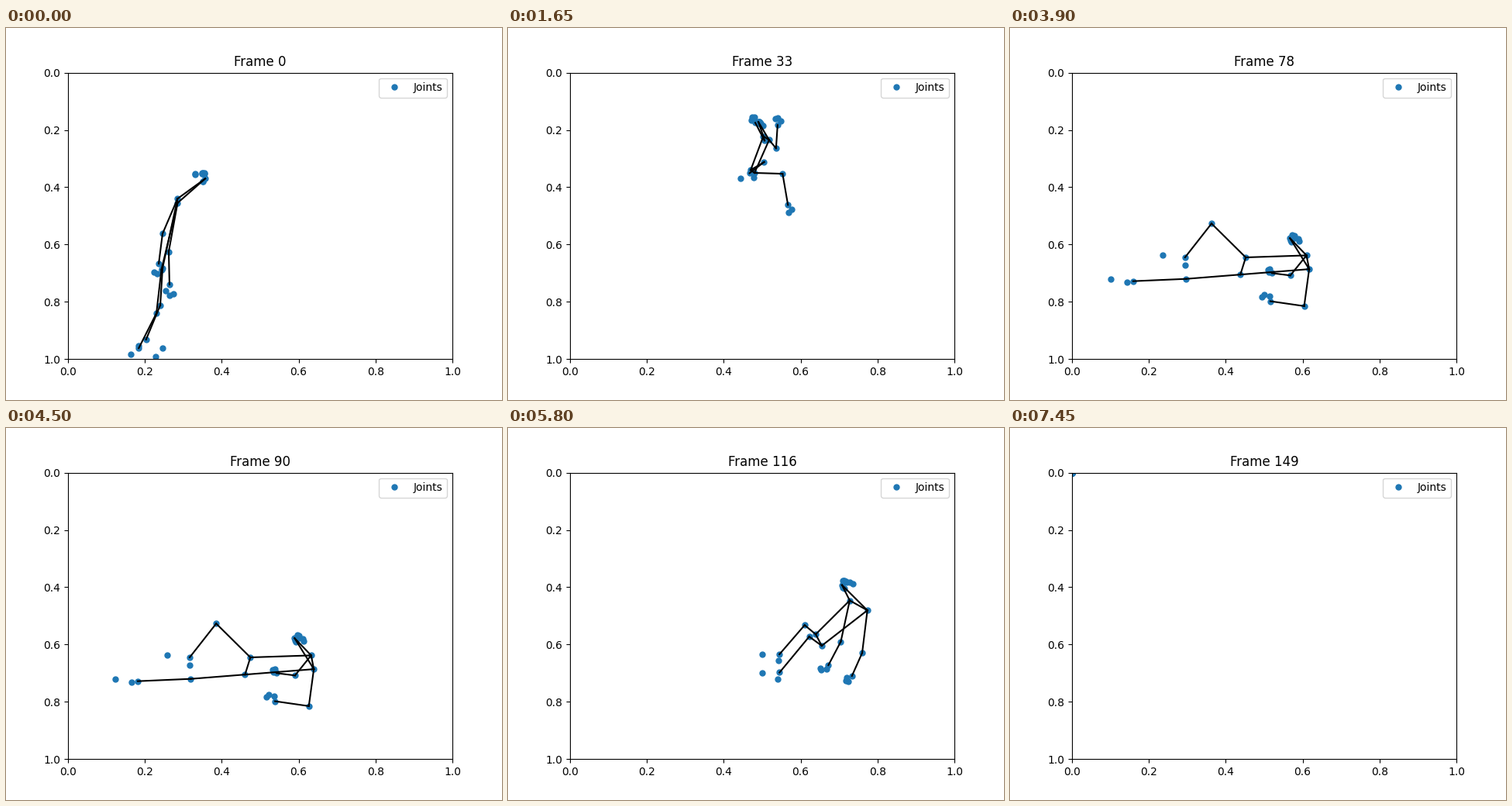
Recreate the animation shown at these times as a matplotlib script. Size 640 px wide and 480 px high, loop 7500 ms.

```python
import numpy as np
import matplotlib.pyplot as plt
from matplotlib.animation import FuncAnimation

FRAMES = 150

# Points are complex numbers x + yj in axes units.
# Order: nose, arm A, arm B, leg A, leg B, then the dots that carry no bone.
CHAINS = [(3, 2, 1, 0, 4, 5, 6), (9, 8, 7, 1, 4, 10, 11, 12), (7, 10)]
BONES = [list(bone) for chain in CHAINS for bone in zip(chain, chain[1:])]


def turned(vector, angle):
    return vector * np.exp(1j * angle)


def face(nose, eye, ear, across):
    """Eyes, ears and mouth, spread along the line of the shoulders."""
    points = []
    for side in (-across, across):
        pupil = nose + eye + 0.06 * side
        lobe = nose + ear + 0.1 * side
        corner = 0.15 * (lobe - pupil)
        mouth = nose + ear / 2 - eye + 0.05 * side
        points += [pupil - corner, pupil, pupil + corner, lobe, mouth]
    return points


def hand(arm, turn, side):
    """Three fingers that fan out along the forearm."""
    _, elbow, wrist = arm
    reach = turned(wrist - elbow, turn)
    return [wrist + turned(size * reach, side * spread)
            for size, spread in ((0.3, -0.3), (0.32, 0), (0.2, 0.5))]


def foot(leg, toe):
    _, knee, ankle = leg
    shin = ankle - knee
    return [ankle + 0.03 * shin / abs(shin) - toe / 4, ankle + toe]


def pose(nose, eye, ear, arm_a, arm_b, leg_a, leg_b, toe, turn=0):
    return np.array([
        nose, *arm_a, *arm_b, *leg_a, *leg_b,
        *face(nose, eye, ear, arm_b[0] - arm_a[0]),
        *hand(arm_a, turn, -1), *hand(arm_b, turn, 1),
        *foot(leg_a, toe), *foot(leg_b, toe)])


run = pose(
    nose=.357+.370j, eye=-.006-.018j, ear=-.026-.016j,
    arm_a=(.285+.440j, .246+.562j, .236+.667j),
    arm_b=(.285+.455j, .262+.625j, .264+.740j),
    leg_a=(.246+.682j, .240+.812j, .203+.932j),
    leg_b=(.243+.688j, .230+.840j, .184+.962j),
    toe=.043+.030j)

jump = pose(
    nose=.490+.172j, eye=.003+.001j, ear=.010+.013j,
    arm_a=(.503+.222j, .506+.237j, .482+.175j),
    arm_b=(.518+.235j, .536+.264j, .540+.183j),
    leg_a=(.470+.340j, .505+.312j, .467+.351j),
    leg_b=(.480+.350j, .553+.353j, .567+.462j),
    toe=.010+.016j)

fall = pose(
    nose=.476+.747j, eye=.015+.002j, ear=.019+.033j,
    arm_a=(.506+.843j, .490+.751j, .473+.680j),
    arm_b=(.411+.878j, .317+.892j, .214+.846j),
    leg_a=(.421+.993j, .367+.802j, .186+.708j),
    leg_b=(.382+1.047j, .318+.878j, .152+.813j),
    toe=-.030-.065j)

lie = pose(
    nose=.567+.578j, eye=.009-.007j, ear=.023+.006j,
    arm_a=(.610+.638j, .568+.708j, .520+.700j),
    arm_b=(.617+.686j, .604+.815j, .516+.798j),
    leg_a=(.452+.645j, .363+.527j, .294+.645j),
    leg_b=(.438+.705j, .297+.720j, .159+.728j),
    toe=-.059-.007j, turn=0.75)

sit = pose(
    nose=.672+.535j, eye=.008-.008j, ear=.029+0j,
    arm_a=(.726+.591j, .710+.735j, .675+.798j),
    arm_b=(.725+.629j, .702+.770j, .669+.830j),
    leg_a=(.597+.643j, .566+.519j, .469+.610j),
    leg_b=(.586+.689j, .542+.565j, .447+.670j),
    toe=-.054-.030j, turn=0.75)

stand = pose(
    nose=.800+.022j, eye=.006-.028j, ear=.011-.025j,
    arm_a=(.732+.070j, .690+.213j, .665+.345j),
    arm_b=(.900+.095j, .911+.264j, .901+.397j),
    leg_a=(.749+.360j, .726+.567j, .742+.697j),
    leg_b=(.834+.384j, .831+.592j, .800+.770j),
    toe=-.024+.079j)

KEYS = {
    0: run,
    24: (run + jump) / 2 + 0.08,
    33: jump,
    46: fall + 0.1 - 0.07j,
    59: fall,
    78: lie,
    94: lie + 0.03,
    102: sit,
    111: sit,
    129: stand,
    146: 1.35 * stand - 0.21,
}
TIMES, POSES = list(KEYS), list(KEYS.values())

# Spans in which tracking is lost and every joint drops to the origin.
LOST = [(15, 18), (47, 50), (108, 110), (146, FRAMES)]


def joints(i):
    if any(start <= i < end for start, end in LOST):
        return np.zeros_like(run)
    k = np.searchsorted(TIMES, i, side="right")
    t = (i - TIMES[k - 1]) / (TIMES[k] - TIMES[k - 1])
    return (1 - t) * POSES[k - 1] + t * POSES[k]


fig, ax = plt.subplots(figsize=(6.4, 4.8), dpi=100)
ax.set_xlim(0, 1)
ax.set_ylim(1, 0)
dots, = ax.plot([], [], "o", markersize=5, color="tab:blue", label="Joints")
limbs = [ax.plot([], [], "k-", lw=1.5)[0] for _ in BONES]
title = ax.set_title("Frame 0")
ax.legend(loc="best")


def update(i):
    p = joints(i)
    dots.set_data(p.real, p.imag)
    for limb, bone in zip(limbs, BONES):
        limb.set_data(p[bone].real, p[bone].imag)
    title.set_text(f"Frame {i}")
    return [dots, title, *limbs]


anim = FuncAnimation(fig, update, frames=FRAMES, interval=50,
                     repeat=True, repeat_delay=0, blit=False)
plt.show()
```
